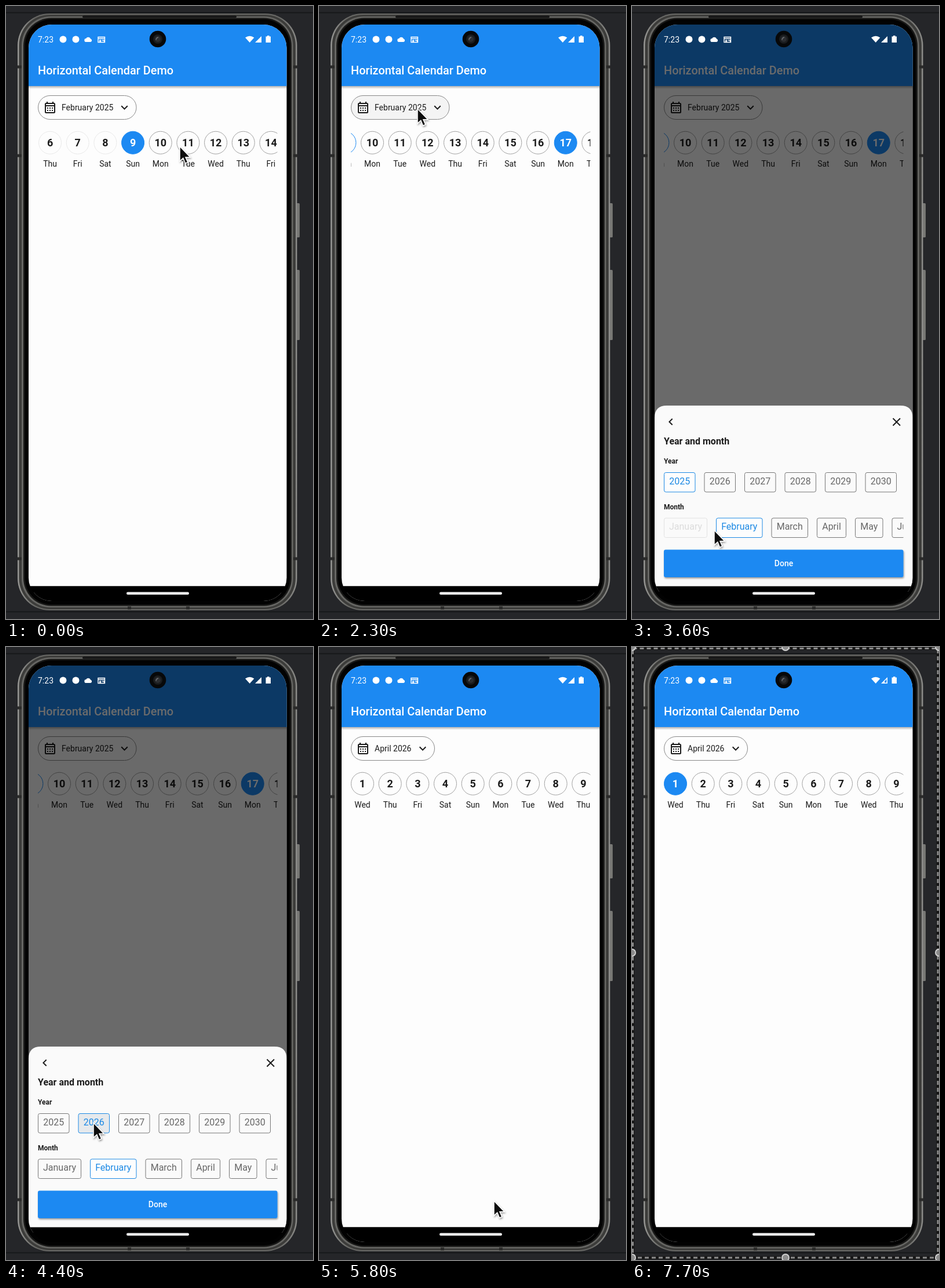
Write an HTML page that moves like this. It is 530 px wide and 1057 px high and loops after 7800 ms.

```html
<!DOCTYPE html>
<html lang="en">
<head>
<meta charset="utf-8">
<title>Horizontal Calendar Demo</title>
<style>
  html, body { margin: 0; width: 100%; height: 100%; overflow: hidden; background: #252629; }
  svg { display: block; width: 530px; height: 1057px; font-family: Roboto, sans-serif; }
  .blue { fill: #1c89f2; }
  .ink { fill: #1b1b1b; }
  .mid { text-anchor: middle; }
  .day circle { fill: #fdfdfd; stroke: #a0a0a0; }
  .day .num { font-size: 18px; font-weight: 600; fill: #1b1b1b; }
  .day .name { font-size: 14px; fill: #1b1b1b; }
  .day.past circle { stroke: #e8e8e8; }
  .day.today circle { stroke: #1c89f2; }
  .day.on circle { fill: #1c89f2; stroke: #1c89f2; }
  .day.on .num { fill: #fff; }
  .chip rect { fill: #fafafa; stroke: #777; }
  .chip text { font-size: 16px; fill: #666; }
  .chip.on rect { stroke: #1c89e4; fill: #fdfdfd; }
  .chip.on text { fill: #1c89e4; }
  .chip.off rect { stroke: #e2e2e2; }
  .chip.off text { fill: #dcdcdc; }
  .chip.pressed rect { fill: #e6e9ec; }
</style>
</head>
<body>
<svg viewBox="0 0 530 1057">
  <defs>
    <clipPath id="screen"><rect x="39" y="32" width="445.500" height="994" rx="40"/></clipPath>
    <clipPath id="row"><rect x="55" y="205" width="413.500" height="800"/></clipPath>
    <linearGradient id="rim" x2="1" y2="0">
      <stop offset="0" stop-color="#979794"/><stop offset=".06" stop-color="#686865"/>
      <stop offset=".94" stop-color="#686865"/><stop offset="1" stop-color="#8c8c89"/>
    </linearGradient>
    <linearGradient id="fade" x2="0" y2="1">
      <stop offset="0" stop-opacity=".3"/><stop offset="1" stop-opacity="0"/>
    </linearGradient>
    <filter id="drop" x="-50%" y="-50%" width="200%" height="200%">
      <feDropShadow dx="1" dy="2" stdDeviation="1.500" flood-opacity=".4"/>
    </filter>
  </defs>

  <!-- backdrop and phone body -->
  <rect width="530" height="1057" fill="#252629"/>
  <path d="M0 11.500H530M0 1044.500H530" stroke="#17181a" stroke-width="2"/>
  <g fill="#777774">
    <rect x="500" y="340" width="7" height="59" rx="1.500"/>
    <rect x="500" y="455" width="7" height="121" rx="1.500"/>
  </g>
  <rect x="20" y="13" width="482.500" height="1029" rx="55" fill="url(#rim)"/>
  <rect x="22.500" y="15" width="477.500" height="1025" rx="53" fill="#3c3c3a"/>
  <rect x="27" y="18" width="468.500" height="1019" rx="50" fill="#666663"/>
  <rect x="30" y="20.500" width="463" height="1014" rx="48" fill="#171716"/>
  <rect x="33" y="23" width="457" height="1009" rx="45" fill="#020202"/>
  <path d="M134 18.500H396" stroke="#161616" stroke-width="4" stroke-linecap="round"/>
  <path d="M20 105h7M20 258h7M20 953h7M496 105h7M496 258h7M496 953h7M210 1038h6M311 1038h6" stroke="#2a2a29" stroke-width="5"/>

  <g clip-path="url(#screen)">
    <rect x="39" y="32" width="446" height="968.500" fill="#fdfdfd"/>
    <rect x="39" y="138" width="446" height="5" fill="url(#fade)"/>
    <rect x="39" y="32" width="446" height="106" class="blue"/>
    <text x="55" y="118" font-size="19.900" font-weight="500" fill="#fff">Horizontal Calendar Demo</text>
    <rect id="picker" x="55.500" y="154.500" height="41" rx="20.500" stroke="#888"/>
    <path class="ink" transform="translate(64 163)" d="M19 4h-1V2h-2v2H8V2H6v2H5c-1.100 0-2 .9-2 2v14c0 1.100.9 2 2 2h14c1.100 0 2-.9 2-2V6c0-1.100-.9-2-2-2zm0 16H5V10h14zm0-12H5V6h14zM9 14H7v-2h2zm4 0h-2v-2h2zm4 0h-2v-2h2zm-8 4H7v-2h2zm4 0h-2v-2h2zm4 0h-2v-2h2z"/>
    <text id="period" class="ink" x="96" y="180" font-size="14"></text>
    <path id="arrow" class="ink" d="M7.400 8.600 12 13.200l4.600-4.600L18 10l-6 6-6-6z"/>
    <g clip-path="url(#row)"><g id="february"></g><g id="april"></g></g>
    <rect id="scrim" x="39" y="32" width="446" height="969"/>

    <g id="sheet">
      <path d="M39 1010V710q0-21 21-21H463.500q21 0 21 21V1010z" fill="#fafafa"/>
      <path class="ink" transform="translate(55 705)" d="M15.400 7.400 14 6l-6 6 6 6 1.400-1.400-4.600-4.600z"/>
      <path d="m450.500 711 12.500 12.500m0-12.500-12.500 12.500" stroke="#1b1b1b" stroke-width="2"/>
      <g class="ink" font-weight="600">
        <text x="55" y="756" font-size="16">Year and month</text>
        <text x="55" y="789" font-size="12">Year</text>
        <text x="55" y="867.500" font-size="12">Month</text>
      </g>
      <g id="years"></g>
      <g clip-path="url(#row)"><g id="months"></g></g>
      <rect x="55" y="937.500" width="413.500" height="47.500" rx="3" class="blue" filter="url(#drop)"/>
      <rect id="donePress" x="55" y="937.500" width="413.500" height="47.500" rx="3" fill="#fff"/>
      <text x="262" y="966" class="mid" font-size="14" font-weight="500" fill="#fff">Done</text>
    </g>
    <rect x="39" y="1000.500" width="446" height="30" fill="#000"/>
  </g>
  <rect x="208" y="1010.500" width="108" height="4.500" rx="2.250" fill="#f4f4f4"/>

  <!-- status bar -->
  <g id="status" fill="#fff">
    <text x="55" y="62.500" font-size="14">7:23</text>
    <circle cx="98.500" cy="57.500" r="6"/><circle cx="120.500" cy="57.500" r="6"/>
    <path d="M138.500 62a3 3 0 0 1-.3-6 4.300 4.300 0 0 1 7.800.6 2.800 2.800 0 0 1 .2 5.400z"/>
    <path fill="none" stroke="#fff" stroke-width="1.400" d="M159 53.500h11.500v9H159zm0 2.500h11.500M161 59h3.500m1.500 0h3.500v3.500M161 61h3"/>
    <path d="M413 54.500q7.700-5.500 15.400 0L420.700 63z"/>
    <path d="M441 52v11H430z"/>
    <path id="weakSignal" class="blue" d="M439.500 55.500v6H436v-2.500z"/>
    <path d="M451 52.500V51h3.500v1.500H457V63h-8.500V52.500z"/>
  </g>
  <circle cx="262" cy="57" r="14.300" fill="#070809"/>
  <circle cx="262" cy="57" r="8" fill="#1a1c1e"/>
  <circle cx="262" cy="57" r="5" fill="#2b2d30"/>
  <path d="M259 58.500q.5-4 4-4.500" fill="none" stroke="#6b6e72" stroke-width="1.500"/>

  <path id="cursor" d="M0 0V25.500l5.800-5.300 3.700 9 4.300-1.800-3.800-8.700H18z" fill="#0a0a0a" stroke="#fff" stroke-width="1.500" filter="url(#drop)"/>

  <g id="crop">
    <rect x="1.500" y="2.500" width="526.500" height="1050.500" fill="none" stroke="#161616" stroke-width="5"/>
    <rect x="1.500" y="2.500" width="526.500" height="1050.500" fill="none" stroke="#8b8b8b" stroke-width="3" stroke-dasharray="7 5"/>
    <g id="handles" fill="#8c8c8c" stroke="#d0d0d0" stroke-width="2"></g>
  </g>
</svg>
<script>
const LOOP = 7800, STEP = 100;
const PITCH = 47.67;
const NAMES = ['Sun', 'Mon', 'Tue', 'Wed', 'Thu', 'Fri', 'Sat'];
const el = id => document.getElementById(id);

function add(parent, tag, attrs, text) {
  const node = document.createElementNS('http://www.w3.org/2000/svg', tag);
  for (const key in attrs) node.setAttribute(key, attrs[key]);
  if (text !== undefined) node.textContent = text;
  return parent.appendChild(node);
}

function addDays(parent, count, firstWeekday) {
  return Array.from({ length: count }, (_, i) => {
    const g = add(parent, 'g', { class: 'day', transform: `translate(${75 + i * PITCH} 0)` });
    add(g, 'circle', { cy: 235.7, r: 19.5 });
    add(g, 'text', { class: 'num mid', y: 242 }, i + 1);
    add(g, 'text', { class: 'name mid', y: 276.5 }, NAMES[(firstWeekday + i) % 7]);
    return g;
  });
}

function addChips(parent, y, labels) {
  let x = 55.5;
  return labels.map(([label, width]) => {
    const g = add(parent, 'g', { class: 'chip' });
    add(g, 'rect', { x, y, width, height: 33.5, rx: 3 });
    add(g, 'text', { class: 'mid', x: x + width / 2, y: y + 20 }, label);
    x += width + 16;
    return g;
  });
}

const february = addDays(el('february'), 28, 6);
const april = addDays(el('april'), 30, 3);
const years = addChips(el('years'), 804.5, [2025, 2026, 2027, 2028, 2029, 2030].map(y => [y, 53.5]));
const months = addChips(el('months'), 883, [['January', 74], ['February', 79.5], ['March', 62.5],
  ['April', 50], ['May', 47.5], ['June', 52]]);
for (const cx of [0, 265, 530])
  for (const cy of [0, 527, 1053])
    if (cx !== 265 || cy !== 527) add(el('handles'), 'circle', { cx, cy, r: 6 });

// Keys are [time, ...values]; each segment eases in and out.
function track(keys, t) {
  const next = keys.findIndex(k => k[0] > t);
  if (next === 0) return keys[0].slice(1);
  if (next < 0) return keys[keys.length - 1].slice(1);
  const a = keys[next - 1], b = keys[next];
  const p = (t - a[0]) / (b[0] - a[0]), e = p * p * (3 - 2 * p);
  return a.slice(1).map((v, i) => v + (b[i + 1] - v) * e);
}

const CURSOR = [
  [0, 300, 242], [200, 318, 241], [500, 224, 240], [600, 236, 240], [800, 238, 240],
  [1000, 278, 238], [1400, 424, 236], [1700, 424, 234], [2000, 170, 177], [2900, 170, 177],
  [3500, 142, 904], [3800, 142, 904], [4200, 152, 820], [4600, 150, 821], [5100, 333, 890],
  [5300, 333, 890], [5500, 302, 955], [6200, 302, 955], [6600, 76, 236], [6800, 76, 236], [7100, 110, -45]
];
const SCROLL = [[100, 237.3], [500, 412]];

const between = (t, a, b) => t >= a && t < b;
const clamp = v => Math.min(1, Math.max(0, v));
const show = (node, on) => node.setAttribute('visibility', on ? 'visible' : 'hidden');
const move = (node, x, y) => node.setAttribute('transform', `translate(${x} ${y})`);

function render(t) {
  const inApril = t >= 5600;
  const picked = t < 700 ? 9 : t < 1400 ? 13 : 17;
  february.forEach((g, i) => {
    g.classList.toggle('past', i < 8);
    g.classList.toggle('today', i === 8);
    g.classList.toggle('on', i + 1 === picked);
  });
  april[0].classList.toggle('on', t >= 6700);
  show(el('february'), !inApril);
  show(el('april'), inApril);
  move(el('february'), -track(SCROLL, t)[0], 0);

  el('period').textContent = inApril ? 'April 2026' : 'February 2025';
  el('picker').setAttribute('width', inApril ? 144 : 169.5);
  el('picker').setAttribute('fill', between(t, 2200, 2600) ? '#f4f4f4' : '#fdfdfd');
  move(el('arrow'), inApril ? 167 : 192.5, 163);

  const opening = 1 - (1 - clamp((t - 2400) / 300)) ** 3;
  const open = opening * (1 - clamp((t - 5500) / 250) ** 2);
  el('scrim').setAttribute('opacity', open * 0.58);
  move(el('sheet'), 0, (1 - open) * 320);
  el('donePress').setAttribute('opacity', between(t, 5500, 5800) ? 0.15 : 0);

  const year = t < 4200 ? 0 : 1, month = t < 5200 ? 1 : 3;
  years.forEach((g, i) => g.classList.toggle('on', i === year));
  years[1].classList.toggle('pressed', between(t, 4200, 4500));
  months.forEach((g, i) => g.classList.toggle('on', i === month));
  months[0].classList.toggle('off', year === 0);
  months[3].classList.toggle('pressed', between(t, 5200, 5500));

  move(el('cursor'), ...track(CURSOR, t));
  show(el('cursor'), t < 7100);
  show(el('weakSignal'), t >= 6900);
  show(el('crop'), t >= 6900);
}

function frame() {
  render(Math.floor(performance.now() / STEP) * STEP % LOOP);
  requestAnimationFrame(frame);
}
frame();
</script>
</body>
</html>
```
